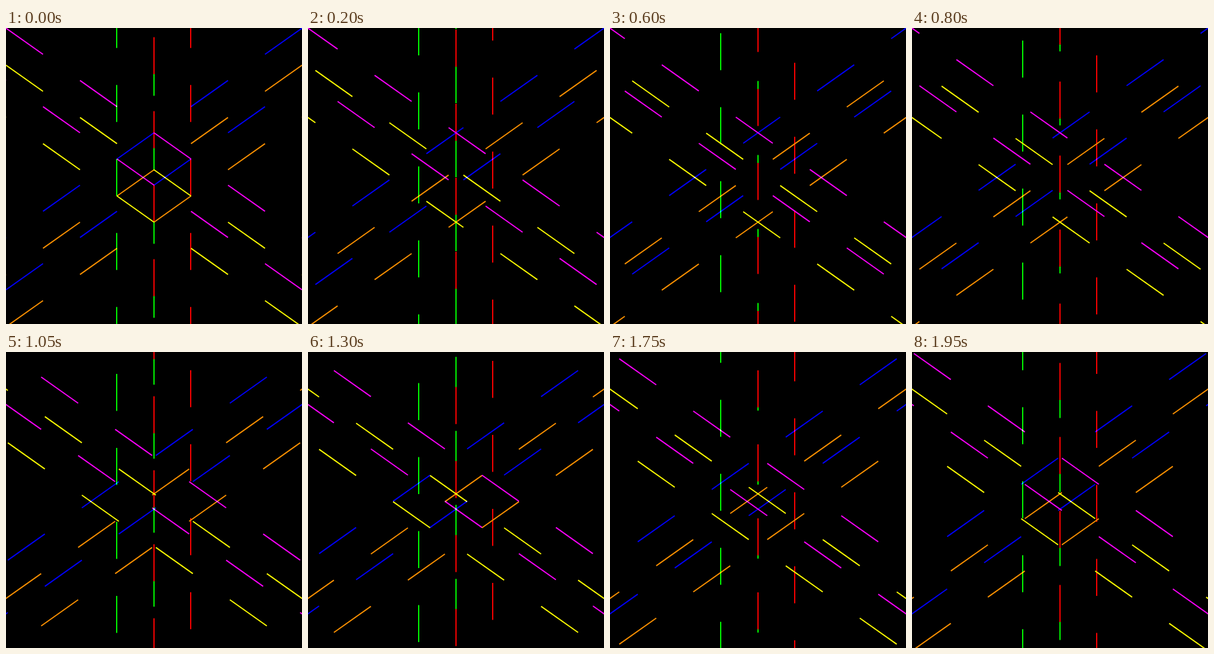
An HTML page with a canvas that plays this animation: 500x500 px, repeating every 2 s.

```html
<!DOCTYPE html>
<html lang="en">
<head>
<meta charset="utf-8">
<title>Drifting cube edges</title>
<style>
  html, body { margin: 0; width: 100%; height: 100%; overflow: hidden; background: #000; }
  canvas { display: block; width: 500px; height: 500px; }
</style>
</head>
<body>
<canvas id="stage" width="500" height="500"></canvas>
<script>
const ctx = document.getElementById('stage').getContext('2d');
const LOOP = 2000, STEP = 50;
const DASH = 62.5, PERIOD = 2 * DASH;
const RISE = DASH * Math.SQRT1_2;

// Cube corners
const CX = 250, CY = 252.5;
const LEFT = CX - DASH;
const UP = CY - DASH / 2, DOWN = CY + DASH / 2;
const TOP = UP - RISE, BOTTOM = DOWN + RISE;
const BACK = DOWN - RISE, FRONT = UP + RISE;

const RED = '#f00', GREEN = '#0f0', BLUE = '#00f';
const MAGENTA = '#f0f', YELLOW = '#ff0', ORANGE = '#ff9000';

// colour, start x, start y, slope sign, drift along x
const diagonals = [
  [BLUE, LEFT, UP, -1, 1],
  [BLUE, CX, FRONT, -1, 1],
  [MAGENTA, CX, TOP, 1, -1],
  [MAGENTA, LEFT, UP, 1, -1],
  [ORANGE, LEFT, DOWN, -1, -1],
  [ORANGE, CX, BOTTOM, -1, -1],
  [YELLOW, CX, BACK, 1, 1],
  [YELLOW, LEFT, DOWN, 1, 1]
];

// Repeats one edge along its own direction; k is the offset in dash lengths
function dashes(color, x, y, dx, dy, shift) {
  ctx.strokeStyle = color;
  ctx.beginPath();
  for (let n = -5; n <= 5; n++) {
    const k = 2 * n + shift;
    ctx.moveTo(x + dx * k, y + dy * k);
    ctx.lineTo(x + dx * (k + 1), y + dy * (k + 1));
  }
  ctx.stroke();
}

function draw(time) {
  const t = Math.floor((time % LOOP) / STEP) * STEP / LOOP;
  const shift = t * PERIOD / DASH;
  const vertical = (color, x, y, dir) => dashes(color, x, y, 0, DASH, dir * shift);

  ctx.globalCompositeOperation = 'source-over';
  ctx.fillStyle = '#000';
  ctx.fillRect(0, 0, 500, 500);
  ctx.lineWidth = 2;

  // The front edge hides the back one
  vertical(GREEN, CX, BACK - DASH, 1);
  vertical(RED, CX, FRONT, -1);

  ctx.globalCompositeOperation = 'lighter';
  vertical(GREEN, 187, UP, 1);
  vertical(RED, 312, UP, -1);
  for (const [color, x, y, slope, dir] of diagonals) {
    dashes(color, x, y, DASH, slope * RISE, dir * shift);
  }
}

const start = performance.now();
function tick() {
  draw(performance.now() - start);
  requestAnimationFrame(tick);
}
tick();
</script>
</body>
</html>
```
